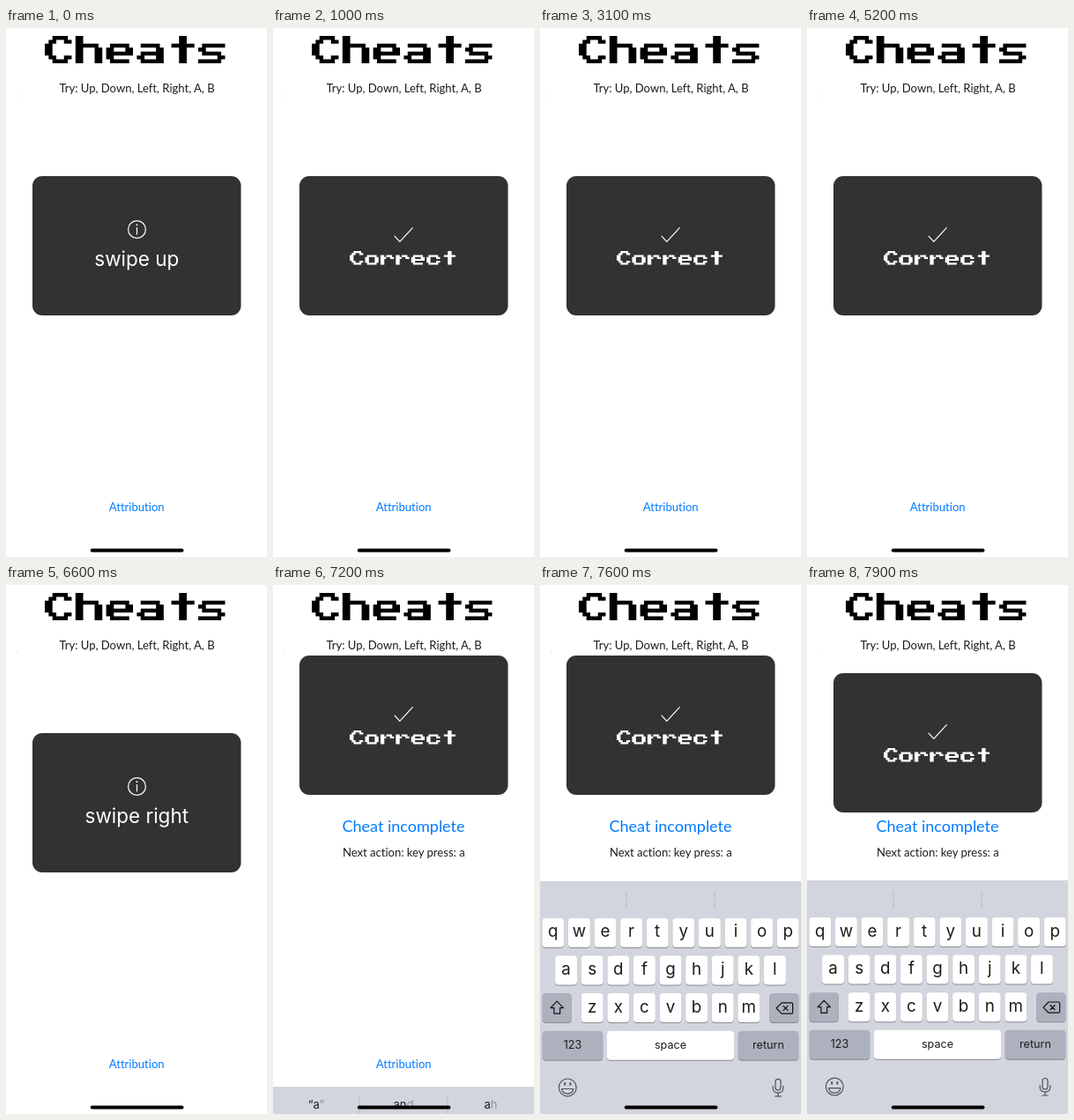
An HTML page for the animation above (8000 ms loop, 296 by 600 pixels).

```html
<!DOCTYPE html>
<html lang="en">
<head>
<meta charset="utf-8">
<title>Cheats</title>
<style>
  html, body { margin: 0; width: 100%; height: 100%; overflow: hidden; background: #fff; }
  svg { display: block; width: 296px; height: 600px; }
  text {
    text-anchor: middle; font-family: Lato, sans-serif; font-size: 13.05px; fill: #1c1c1c;
    font-variant-ligatures: none;
  }
  .blue { fill: #007aff; }
  .ui text { font-family: Inter, sans-serif; }
  .line { fill: none; stroke: #fff; stroke-width: 1.2; stroke-linecap: round; stroke-linejoin: round; }
  .ink { fill: none; stroke: #111; stroke-width: 1.2; stroke-linejoin: round; }
  .grey { stroke: #50535a; stroke-linecap: round; }
</style>
</head>
<body>
<svg id="stage" viewBox="0 0 296 600">
  <rect x="12.5" y="76.5" width="1" height="1" fill="#bbb"/>
  <g id="title" aria-label="Cheats" transform="translate(44 9) scale(4.35 4.43)"></g>
  <text x="148.5" y="72.5">Try: Up, Down, Left, Right, A, B</text>
  <text class="blue" x="148" y="280" style="font-size:18px">Cheat incomplete</text>
  <text x="148.3" y="307.5">Next action: key press: a</text>
  <text class="blue" x="148.2" y="548.2">Attribution</text>

  <g id="card" class="ui">
    <rect x="30" width="236.5" height="158" rx="11" fill="#333134"/>
    <g id="info">
      <circle class="line" cx="148.5" cy="60.5" r="9.9"/>
      <path class="line" d="M148.5 58.6v7.4"/>
      <circle cx="148.5" cy="55.2" r="1" fill="#fff"/>
      <text id="hint" x="148.3" y="102" style="font-size:22.5px;fill:#fff"></text>
    </g>
    <g id="done">
      <path class="line" d="M138 68.2l5.8 6.2L158.3 58.6"/>
      <g id="correct" aria-label="Correct" fill="#fff" transform="translate(87 85) scale(2.18 2.22)"></g>
    </g>
  </g>

  <g id="board" class="ui">
    <rect width="296" height="300" fill="#d2d5dd"/>
    <path d="M98 12v19M198 12v19" stroke="#b9bcc4"/>
    <g id="words">
      <text x="49" y="25">“a<tspan fill="#8d9097">”</tspan></text>
      <text x="148" y="25">an<tspan fill="#8d9097">d</tspan></text>
      <text x="247" y="25">a<tspan fill="#8d9097">h</tspan></text>
    </g>
    <g id="keys"></g>
    <path class="ink" d="M19.3 136.3l7.2 7.4h-3.8v6.6h-6.8v-6.6h-3.8z"/>
    <path class="ink" d="M274 138h11.2q1.4 0 1.4 1.4v9.4q0 1.4-1.4 1.4H274l-6-6.1zM275.6 141.2l5.8 5.8m0-5.8l-5.8 5.8"/>
    <g class="ink grey">
      <circle cx="31.3" cy="234" r="9.9"/>
      <path d="M24.6 235.6h13.4q-1 5.6-6.7 5.6t-6.7-5.6z"/>
      <path d="M28.2 229v1.8M34.4 229v1.8" stroke-width="2"/>
      <rect x="267" y="224.5" width="6" height="12.5" rx="3"/>
      <path d="M264.2 232.5v2q0 5.5 5.8 5.5t5.8-5.5v-2M270 240v4M266.8 244h6.4"/>
    </g>
  </g>
  <rect x="95.7" y="590.6" width="105.8" height="4" rx="2"/>
</svg>
<script>
const LOOP = 8000, STEP = 100;
const $ = id => document.getElementById(id);

function add(parent, tag, attrs, label = '') {
  const el = document.createElementNS('http://www.w3.org/2000/svg', tag);
  for (const k in attrs) el.setAttribute(k, attrs[k]);
  el.textContent = label;
  return parent.appendChild(el);
}

// Blocky lettering on an 8-unit grid
const glyphs = {
  C: 'M2 0h4v1h1v1h-2v-1h-2v1h-1v3h1v1h2v-1h2v1h-1v1h-4v-1h-1v-1h-1v-3h1v-1h1z',
  h: 'M0 0h2v2h4v1h1v4h-2v-4h-3v4h-2z',
  e: 'M1 2h5v1h1v2h-5v1h4v1h-5v-1h-1v-3h1zM2 3v1h3v-1z',
  a: 'M1 2h5v1h1v4h-6v-1h-1v-1h1v-1h4v-1h-4zM2 5v1h3v-1z',
  t: 'M3 0h2v2h2v1h-2v4h-2v-4h-2v-1h2z',
  s: 'M1 2h6v1h-5v1h4v1h1v1h-1v1h-6v-1h5v-1h-4v-1h-1v-1h1z',
  r: 'M0 2h2v1h1v-1h3v1h1v1h-2v-1h-2v1h-1v3h-2z',
  o: 'M1 2h5v1h1v3h-1v1h-5v-1h-1v-3h1zM2 3v3h3v-3z',
  c: 'M1 2h5v1h1v1h-2v-1h-3v3h3v-1h2v1h-1v1h-5v-1h-1v-3h1z'
};
function blockText(parent, word) {
  [...word].forEach((ch, i) => add(parent, 'path', { d: glyphs[ch], transform: `translate(${i * 8})` }));
}
blockText($('title'), 'Cheats');
blockText($('correct'), 'Correct');

const PITCH = 29.6, ROW = 42.6, TOP = 42;
function key(x, row, width, label, dark) {
  const y = TOP + row * ROW, fill = dark ? '#acb1bd' : '#fff', word = label.length > 1;
  const box = { x: x - width / 2, width, height: 33, rx: 4 };
  add($('keys'), 'rect', { ...box, y: y + 1, fill: '#898b91' });
  add($('keys'), 'rect', { ...box, y, fill });
  add($('keys'), 'text', { x, y: y + (word ? 20.5 : 21.5), style: `font-size:${word ? 12.6 : 18.8}px` }, label);
}
['qwertyuiop', 'asdfghjkl', 'zxcvbnm'].forEach((letters, row) =>
  [...letters].forEach((ch, i) => key(PITCH * (i + [0.5, 1, 2][row]), row, 24.9, ch)));
key(19.2, 2, 33, '', true);
key(276.8, 2, 33, '', true);
key(37, 3, 68.5, '123', true);
key(148, 3, 144, 'space');
key(259, 3, 68.5, 'return', true);

// Messages over time; an empty one shows the tick
const messages = [
  [0, 'swipe up'], [1000, ''], [2100, 'swipe down'], [3100, ''],
  [4200, 'swipe left'], [5200, ''], [6200, 'swipe right'], [7200, '']
];
const RISE = 7168, DROP = 7760, OMEGA = Math.sqrt(1000 / 3);

// Critically damped spring
function boardTop(t) {
  if (t < RISE) return 600;
  const x = OMEGA * (t - RISE) / 1000;
  return 335 + 265 * (1 + x) * Math.exp(-x);
}
function cardTop(t) {
  if (t < 7200) return 168;
  return 80 + 20 * (Math.max(0, t - DROP) / 140) ** 2;
}
const show = (id, on) => { $(id).style.display = on ? '' : 'none'; };
const moveY = (id, y) => $(id).setAttribute('transform', `translate(0 ${y.toFixed(2)})`);

function draw() {
  const t = Math.floor(performance.now() % LOOP / STEP) * STEP;
  const msg = messages.filter(m => m[0] <= t).pop()[1];
  $('hint').textContent = msg;
  show('info', msg);
  show('done', !msg);
  show('words', t < 7300);
  moveY('card', cardTop(t));
  moveY('board', boardTop(t));
  requestAnimationFrame(draw);
}
draw();
</script>
</body>
</html>
```
